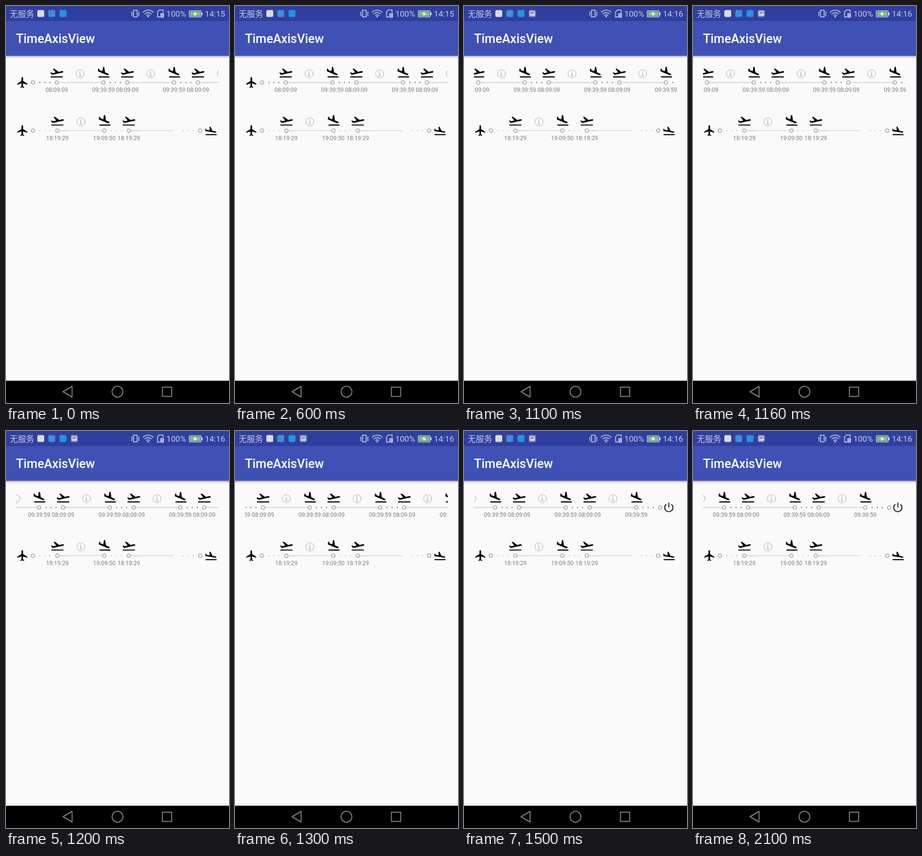
An HTML page that plays this animation: 356x633 px, repeating every 2500 ms.

```html
<!DOCTYPE html>
<html lang="en">
<head>
<meta charset="utf-8">
<title>TimeAxisView</title>
<style>
html, body { margin: 0; width: 100%; height: 100%; overflow: hidden; background: #fafafa; }
svg { display: block; width: 356px; height: 633px; }
.status { font: 13px Roboto, "Noto Sans CJK SC", sans-serif; fill: #c7cbe6; }
.title { font: 500 19.7px Roboto, sans-serif; fill: #fff; }
.time { font: 9.3px Roboto, sans-serif; fill: #7c7c7c; text-anchor: middle; }
.outline { fill: none; stroke: #c7cbe6; stroke-width: 1.3; }
.nav { fill: none; stroke: #858585; stroke-width: 1.5; }
.node { fill: #fafafa; stroke: #858585; stroke-width: .9; }
.info { fill: none; stroke: #aaa; stroke-width: 1; }
</style>
</head>
<body>
<svg viewBox="0 0 356 633">
  <defs>
    <path id="plane" d="M21 16v-2l-8-5V3.5c0-.83-.67-1.5-1.5-1.5S10 2.67 10 3.5V9l-8 5v2l8-2.5V19l-2 1.5V22l3.5-1 3.5 1v-1.5L13 19v-5.5z"/>
    <path id="takeoff" d="M2.5 19h19v2h-19zM22.07 9.64c-.21-.8-1.04-1.28-1.84-1.06L14.92 10l-6.9-6.43-1.93.51 4.14 7.17-4.97 1.33-1.97-1.54-1.45.39 2.59 4.49 1.6-.43 5.31-1.42 4.35-1.16L21 11.49c.81-.23 1.28-1.05 1.07-1.85z"/>
    <path id="landingPlane" d="M9.68 13.27l9.66 2.58c.8.21 1.62-.26 1.84-1.06.21-.8-.26-1.62-1.06-1.84l-5.31-1.42-2.76-9.02L10.12 2v8.28L5.15 8.95l-.93-2.32-1.45-.39v5.17z"/>
    <g id="landing">
      <use href="#landingPlane" transform="rotate(9 12 11)"/>
      <path d="M4 19h18v2H4z"/>
    </g>
    <g id="arrival">
      <use href="#landingPlane" transform="rotate(-3 12 11)"/>
      <path d="M3 18.7h19V21H3z"/>
    </g>
    <g id="info" class="info">
      <circle r="6.4" stroke-dasharray="3 .6"/>
      <path d="M0-3.6v1.5M-1.3-.8H0v4M-1.5 3.3h3"/>
    </g>
    <linearGradient id="shadow" x2="0" y2="1">
      <stop stop-color="#000" stop-opacity=".24"/>
      <stop offset="1" stop-color="#000" stop-opacity="0"/>
    </linearGradient>
    <clipPath id="window"><path d="M16 85h324v60H16z"/></clipPath>
  </defs>

  <path fill="#fafafa" d="M0 0h356v633H0z"/>
  <path fill="#303f9f" d="M0 0h356v24H0z"/>
  <path fill="#3f51b5" d="M0 24h356v55.5H0z"/>
  <path fill="url(#shadow)" d="M0 79.5h356v4H0z"/>
  <text class="title" x="16" y="59">TimeAxisView</text>

  <g class="status">
    <text x="6" y="16.5">无服务</text>
    <text x="256" y="16.5">100%</text>
    <text id="clock" x="317.5" y="16.5"></text>
    <rect x="50" y="6.5" width="11" height="11" rx="2" fill="#d9dcd8"/>
    <rect x="67.5" y="6.5" width="11" height="11" rx="2" fill="#3f8fd6"/>
    <rect x="85.5" y="6.5" width="11" height="11" rx="2" fill="#2196e3"/>
    <g id="picture">
      <rect x="103.5" y="6.5" width="11" height="11" rx="2" fill="#8990b5"/>
      <path d="M105.5 9h7v6h-7z" fill="none" stroke="#e0e2ef"/>
      <path d="M106 15l2-3 1.5 1.5 1.5-2 1.5 3.5z" fill="#e0e2ef"/>
    </g>
    <path class="outline" d="M203.6 6.6h5.8v10.8h-5.8zM201 9v7M212 9v7"/>
    <path class="outline" d="M218.7 10.2a11.5 11.5 0 0 1 16.6 0M221.3 12.9a8 8 0 0 1 11.4 0M224 15.4a4.3 4.3 0 0 1 6 0"/>
    <circle cx="227" cy="17" r="1.3"/>
    <path class="outline" d="M246 17.5h-4V9.2l2.7-2.8h6v4"/>
    <path d="M246.5 11.5h5.5v7h-5.5z"/>
    <path d="M249.2 12.7v2.6M249.2 16.2v1.2" stroke="#303f9f"/>
    <rect class="outline" x="292.6" y="7.6" width="18.8" height="9.8" rx="1"/>
    <path d="M312 10.3h1.8v4.4H312z"/>
    <path fill="#7cc576" d="M294 9h16v7h-16z"/>
    <path fill="#fff" d="M302.8 8.8l-4.3 4h3l-.8 3.5 4.8-4.3h-3.2z"/>
  </g>

  <g clip-path="url(#window)"><g id="scroller"></g></g>
  <g id="fixedAxis"></g>

  <path d="M0 597.5h356V633H0z"/>
  <g class="nav">
    <path d="M105.5 606.5v17L91 615z" stroke-linejoin="round"/>
    <circle cx="178" cy="615" r="8.7"/>
    <path d="M249.7 607.7h14.8v14.8h-14.8z"/>
  </g>
</svg>
<script>
const byId = id => document.getElementById(id);

const icon = (name, x, y, sx = 1, sy = sx) =>
  `<use href="#${name}" transform="translate(${x} ${y}) scale(${sx} ${sy}) translate(-12 -12)"/>`;
const node = (x, y) => `<circle class="node" cx="${x}" cy="${y}" r="2.9"/>`;
const dots = (x, y, color) =>
  [11, 19, 27].map(d => `<circle cx="${x + d}" cy="${y}" r=".9" fill="${color}"/>`).join('');
const line = (x1, x2, y, color) =>
  `<path d="M${x1} ${y}H${x2}" stroke="${color}" stroke-width="1.1"/>`;
const info = (x, y) => `<use href="#info" x="${x}" y="${y - 14}"/>`;
const label = (x, y, text) => `<text class="time" x="${x}" y="${y + 15.2}">${text}</text>`;
const departure = (x, y, text) =>
  icon('takeoff', x, y - 15.4, 1.02, .81) + node(x, y) + label(x, y, text);
const landing = (x, y, text) =>
  icon('landing', x, y - 16.1, .97, .9) + node(x, y) + label(x, y, text);
const start = y => icon('plane', 26.4, y, .85) + node(43, y);

function scrollingAxis() {
  const y = 122, gray = '#c2c2c2', dark = '#6c6c6c', legs = 4, period = 112.7;
  let out = start(y) + dots(43, y, dark);
  for (let i = 0; i < legs; i++) {
    const from = 81 + i * period, to = from + 74.5;
    out += line(from, to, y, gray) + info(from + 37.3, y) +
      departure(from, y, '08:09:09') + landing(to, y, '09:39:59') + dots(to, y, dark);
  }
  const end = 81 + legs * period, power = end + 13.7;
  return out + node(end, y) +
    `<path d="M${power - 4} ${y - 5.2}a6.6 6.6 0 1 0 8 0M${power} ${y - 7.8}v7.8"
      fill="none" stroke="#111" stroke-width="1.5"/>`;
}

function fixedAxis() {
  const y = 198.7, yellow = '#d3c582', blue = '#b4d5ee';
  return start(y) + line(82, 157, y, blue) + line(196, 268, y, blue) +
    line(85, 100, y, '#cfd5d2') + line(199, 214, y, '#cfd5d2') +
    [43, 157, 272].map(x => dots(x, y, yellow)).join('') + info(119.5, y) +
    departure(82, y, '18:19:29') + landing(157, y, '19:09:50') +
    departure(196, y, '18:19:29') + node(310, y) + icon('arrival', 327, 199.5, .93, .72);
}

byId('scroller').innerHTML = scrollingAxis();
byId('fixedAxis').innerHTML = fixedAxis();

// Scroll positions of the swipe, one every 100 ms after the first second.
const offsets = [0, 23.5, 58.5, 102.6, 149, 189, 218.5];

function draw(now) {
  const t = now % 2500;
  const step = Math.max(0, Math.min(6, Math.floor((t - 900) / 100)));
  byId('scroller').setAttribute('transform', `translate(${-offsets[step]} 0)`);
  byId('clock').textContent = step < 2 ? '14:15' : '14:16';
  byId('picture').style.display = step ? '' : 'none';
  requestAnimationFrame(draw);
}
draw(performance.now());
</script>
</body>
</html>
```
